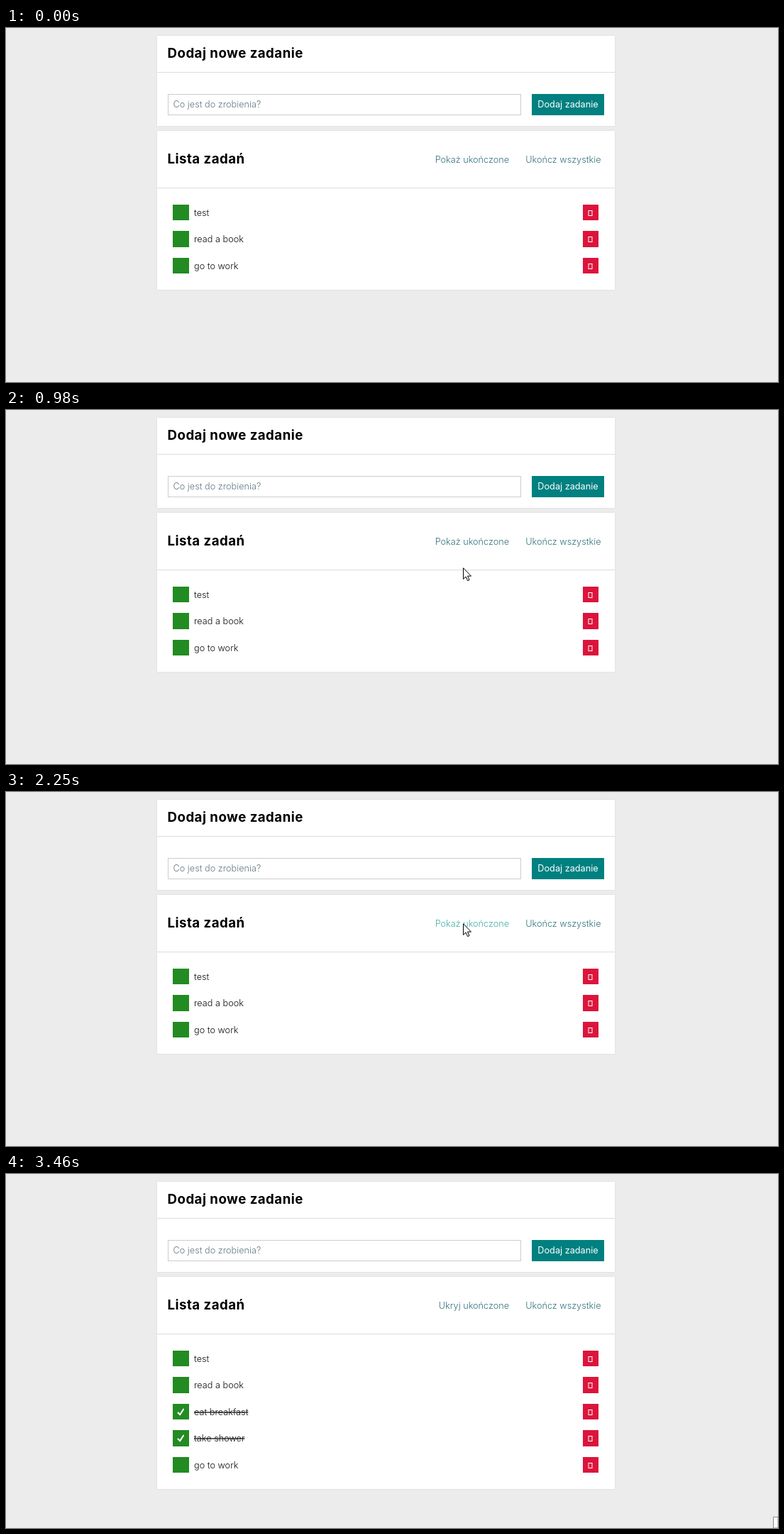
Recreate the animation shown at these times as an HTML page. Size 1088x499 px, loop 4.11 s.

```html
<!DOCTYPE html>
<html lang="pl">
<head>
<meta charset="utf-8">
<title>Lista zadań</title>
<style>
  html, body { margin: 0; width: 100%; height: 100%; overflow: hidden; background: #ececec; }
  svg { display: block; width: 1088px; height: 499px; }
  text { font: 300 12.7px Inter, "Open Sans", sans-serif; fill: #111; }
  .title { font-size: 18.72px; font-weight: 700; letter-spacing: .45px; fill: #000; }
  .card { fill: #fff; filter: drop-shadow(0 0 1px rgba(0, 0, 0, .08)); }
  .rule { stroke: #ddd; }
  .field { fill: #fff; stroke: #ccc; }
  .hint { fill: #5f7a80; }
  .button { fill: #008080; }
  .label { fill: #fff; font-weight: 400; text-anchor: middle; }
  .link { fill: #33727c; text-anchor: end; }
  .toggle { fill: #228b22; shape-rendering: crispEdges; }
  .remove { fill: #dc143c; shape-rendering: crispEdges; }
  .icon { fill: none; stroke: #fff; }
  .check { fill: none; stroke: #fff; stroke-width: 2.1; stroke-linecap: round; stroke-linejoin: round; }
  .done { text-decoration: line-through; }
</style>
</head>
<body>
<svg viewBox="0 0 1088 499">
  <rect class="card" x="213" y="11" width="645" height="127"/>
  <path class="rule" d="M213 62.5H858"/>
  <text class="title" x="227.5" y="42">Dodaj nowe zadanie</text>
  <rect class="field" x="228.5" y="93.5" width="497" height="29"/>
  <text class="hint" x="235.5" y="112">Co jest do zrobienia?</text>
  <rect class="button" x="741" y="93" width="102" height="30"/>
  <text class="label" x="792" y="112">Dodaj zadanie</text>

  <rect class="card" id="list" x="213" y="145" width="645" height="224"/>
  <path class="rule" d="M213 225.5H858"/>
  <text class="title" x="227.5" y="191">Lista zadań</text>
  <text class="link" id="filter" x="709" y="190"></text>
  <text class="link" x="838.5" y="190">Ukończ wszystkie</text>
  <g id="short"></g>
  <g id="full"></g>

  <circle id="click" cx="644" cy="185" r="12" fill="#ff0" fill-opacity=".5"/>
  <path id="cursor" d="M.5 .7V16.4L4.1 13 6.6 18.6 9 17.6 6.5 12.1H11.5Z"
        fill="#fff" stroke="#000" stroke-linejoin="round"/>
  <path id="tip" d="M1088 483.5H1081.5V499H1088Z" fill="#fff" stroke="#8a8a8a"/>
</svg>
<script>
const LOOP = 4110;
const SHOW_DONE = 2320;
const $ = id => document.getElementById(id);

const tasks = [
  ['test'], ['read a book'], ['eat breakfast', true], ['take shower', true], ['go to work']
];

function row([name, done], slot) {
  const top = 248.75 + 37.5 * slot;
  const y = Math.round(top);
  return `<rect class="toggle" x="235.25" y="${top}" width="22.5" height="22.5"/>
    ${done ? `<path class="check" d="M242.5 ${y + 12.5}l2.7 2.8 4.8-7.6"/>` : ''}
    <text class="${done ? 'done' : ''}" x="265" y="${y + 16}">${name}</text>
    <rect class="remove" x="812.75" y="${top}" width="22.5" height="22.5"/>
    <rect class="icon" x="821" y="${y + 8.5}" width="5" height="7"/>`;
}

$('full').innerHTML = tasks.map(row).join('');
$('short').innerHTML = tasks.filter(task => !task[1]).map(row).join('');

const ramp = (t, from, to) => Math.min(1, Math.max(0, (t - from) / (to - from)));
const ease = k => k * k * (3 - 2 * k);
const lerp = (a, b, k) => a + (b - a) * k;
const mix = (a, b, k) => `rgb(${a.map((v, i) => Math.round(lerp(v, b[i], k)))})`;
const show = (id, on) => $(id).setAttribute('visibility', on ? 'visible' : 'hidden');

// Sweeps in along an arc, climbs onto the link, then leaves at the bottom right.
function pointer(t) {
  const arrive = ramp(t, 70, 600);
  const climb = ease(ramp(t, 910, 1320));
  const leave = ease(ramp(t, 2750, 2860));
  const x = lerp(680, 644, arrive) - 26 * Math.sin(Math.PI * arrive) + 418 * leave;
  const y = lerp(342, 225, 1 - (1 - arrive) ** 2) - 40 * climb + 306 * leave;
  return [x, y + 9 * ramp(t, 2880, 2930)].map(Math.round);
}

function draw(t) {
  const open = t >= SHOW_DONE;
  show('full', open);
  show('short', !open);
  $('list').setAttribute('height', open ? 299 : 224);

  const hover = open
    ? ramp(t, 2200, 2720) * (1 - ramp(t, 2790, 3120))
    : ramp(t, 1180, 1590);
  $('filter').textContent = open ? 'Ukryj ukończone' : 'Pokaż ukończone';
  $('filter').style.fill = mix([51, 114, 124], [70, 172, 170], hover);

  show('cursor', t >= 70 && t < 2930);
  $('cursor').setAttribute('transform', `translate(${pointer(t)})`);

  show('click', t >= 2110 && t < 2250);
  show('tip', t >= 3390);
}

const start = performance.now();
function tick() {
  draw((performance.now() - start) % LOOP);
  requestAnimationFrame(tick);
}
tick();
</script>
</body>
</html>
```
